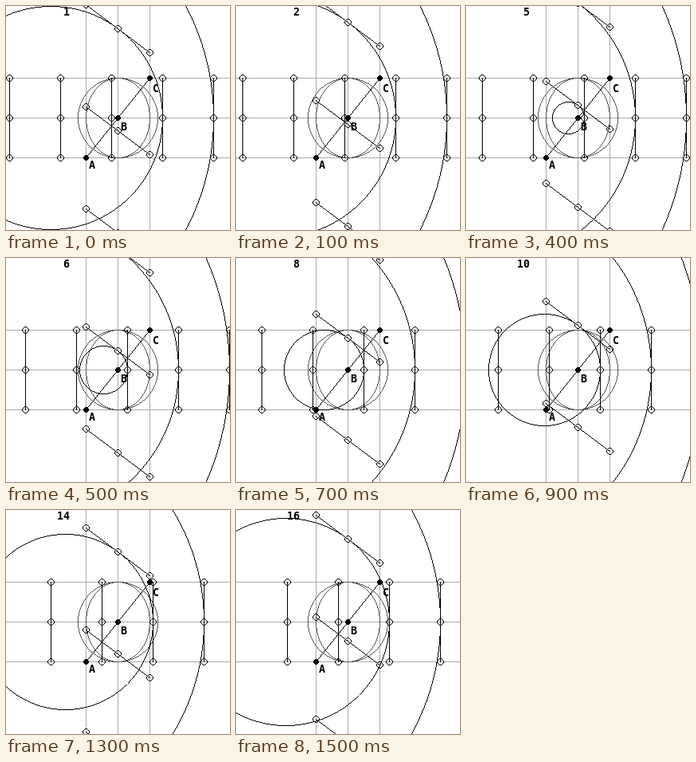
An HTML page with a canvas for the animation above (1.6 s loop, 281 by 281 pixels).

```html
<!DOCTYPE html>
<html lang="en">
<head>
<meta charset="utf-8">
<title>Moving wave fronts</title>
<style>
  html, body { margin: 0; width: 100%; height: 100%; overflow: hidden; background: #fff; }
  #stage { position: relative; width: 281px; height: 281px; overflow: hidden; }
  canvas { display: block; image-rendering: pixelated; }
  svg { position: absolute; left: 0; top: 0; }
  text { font: bold 13.3px "DejaVu Sans Mono", monospace; fill: #000; }
</style>
</head>
<body>
<div id="stage">
  <canvas id="view" width="281" height="281"></canvas>
  <svg width="281" height="281">
    <text id="count" x="80" y="12" text-anchor="end">1</text>
    <text x="104" y="204">A</text>
    <text x="144" y="156">B</text>
    <text x="184" y="108">C</text>
  </svg>
</div>
<script>
const SIZE = 281, MID = 140, STEPS = 16, STEP_MS = 100;
const ctx = document.getElementById('view').getContext('2d');
const count = document.getElementById('count');

const plot = (x, y) => ctx.fillRect(x, y, 1, 1);

function line(x0, y0, x1, y1) {
  const n = Math.max(Math.abs(x1 - x0), Math.abs(y1 - y0));
  for (let i = 0; i <= n; i++) {
    plot(Math.round(x0 + (x1 - x0) * i / n), Math.round(y0 + (y1 - y0) * i / n));
  }
}

// One-pixel outline: scan along x where it is flat, along y where it is steep
function ellipse(cx, cy, rx, ry) {
  const mirror = (x, y) => {
    plot(cx + x, cy + y); plot(cx - x, cy + y);
    plot(cx + x, cy - y); plot(cx - x, cy - y);
  };
  const d = Math.hypot(rx, ry);
  for (let x = 0; x <= rx * rx / d; x++) {
    mirror(x, Math.round(ry * Math.sqrt(1 - x * x / (rx * rx))));
  }
  for (let y = 0; y <= ry * ry / d; y++) {
    mirror(Math.round(rx * Math.sqrt(1 - y * y / (ry * ry))), y);
  }
}

const ring = (x, y, r = 4) => ellipse(x, y, r, r);

function disk(x, y) {
  for (let dy = -3; dy <= 3; dy++) {
    const w = Math.floor(Math.sqrt(10 - dy * dy));
    ctx.fillRect(x - w, y + dy, 2 * w + 1, 1);
  }
}

// Segment with a ring at each end and in the middle
function rod(x, y, dx, dy) {
  line(x - dx, y - dy, x + dx, y + dy);
  for (const s of [-1, 0, 1]) ring(x + s * dx, y + s * dy);
}

function backdrop() {
  ctx.fillStyle = '#fff';
  ctx.fillRect(0, 0, SIZE, SIZE);
  ctx.fillStyle = '#aaa';
  for (const s of [-1, 0, 1]) {
    ctx.fillRect(MID + s * 40, 0, 1, SIZE);
    ctx.fillRect(0, MID + s * 50, SIZE, 1);
  }
  ctx.fillStyle = '#555';
  ellipse(MID, MID, 50, 50);
  ellipse(MID, MID, 40, 50);
}

function draw(n) {
  backdrop();
  ctx.fillStyle = '#000';

  line(100, 190, 180, 90);
  for (const s of [-1, 0, 1]) disk(MID + s * 40, MID - s * 50);

  for (let x = 4 * n; x < SIZE + 4; x += 64) rod(x, MID, 0, 50);
  for (let y = 36 - 8 * n; y < SIZE + 34; y += 128) rod(MID, y, 40, 30);

  // Each front grows by 10 while its centre drifts left by 6
  for (let age = n - 3; age < 42; age += STEPS) {
    if (age > 0) ring(MID - 6 * age, MID, 10 * age);
  }
  count.textContent = n;
}

let shown = 0;
function tick() {
  const n = Math.floor(performance.now() / STEP_MS) % STEPS + 1;
  if (n !== shown) draw(shown = n);
  requestAnimationFrame(tick);
}
tick();
</script>
</body>
</html>
```
